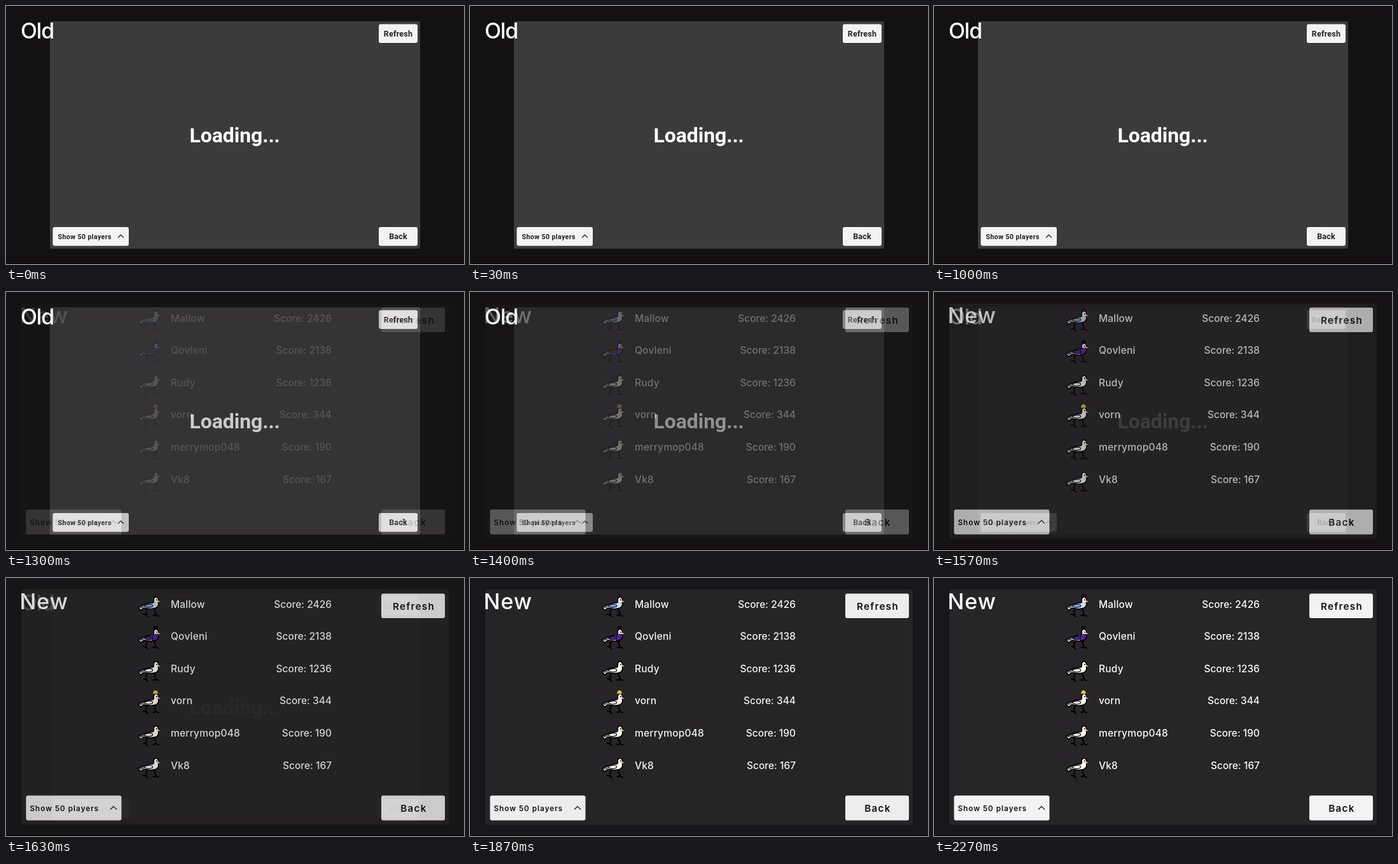
An HTML page with a canvas that plays this animation: 720x405 px, repeating every 3 s.

```html
<!DOCTYPE html>
<html lang="en">
<head>
<meta charset="utf-8">
<title>Leaderboard</title>
<style>
html, body { margin: 0; width: 100%; height: 100%; overflow: hidden; background: #000; }
canvas { display: block; width: 720px; height: 405px; }
</style>
</head>
<body>
<canvas id="stage" width="720" height="405"></canvas>
<script>
const W = 720, H = 405, LOOP = 3000;
const ctx = document.getElementById('stage').getContext('2d');

const OLD_FONT = 'Roboto, sans-serif';
const NEW_FONT = 'Inter, sans-serif';
const INK = '#242126', PAPER = '#f4f2f5';

function makeLayer(paint) {
  const layer = document.createElement('canvas');
  layer.width = W;
  layer.height = H;
  paint(layer.getContext('2d'));
  return layer;
}

function box(c, x, y, w, h, radius, fill) {
  c.fillStyle = fill;
  c.beginPath();
  c.roundRect(x, y, w, h, radius);
  c.fill();
}

function label(c, text, x, y, font, fill, align = 'left', spacing = 0) {
  c.font = font;
  c.fillStyle = fill;
  c.textAlign = align;
  c.letterSpacing = spacing + 'px';
  c.fillText(text, x, y);
}

function chevron(c, x, y, halfWidth, height) {
  c.strokeStyle = INK;
  c.lineWidth = 1.4;
  c.beginPath();
  c.moveTo(x - halfWidth, y + height);
  c.lineTo(x, y);
  c.lineTo(x + halfWidth, y + height);
  c.stroke();
}

function backdrop(c, outer) {
  c.fillStyle = outer;
  c.fillRect(0, 0, W, H - 1);
}

function paintOld(c) {
  backdrop(c, '#131114');
  box(c, 69, 24, 582, 357, 3, '#3d3a3d');
  label(c, 'Loading...', 359.7, 213.5, `700 32px ${OLD_FONT}`, '#fff', 'center', -0.1);

  box(c, 586, 28.5, 61, 29.5, 3, PAPER);
  box(c, 586, 347, 61, 29.5, 3, PAPER);
  box(c, 73.5, 347, 119.5, 29.5, 3, PAPER);
  const font = `600 12.5px ${OLD_FONT}`;
  label(c, 'Refresh', 616.5, 47.5, font, INK, 'center', 0.2);
  label(c, 'Back', 616.5, 366, font, INK, 'center', 0.2);
  label(c, 'Show 50 players', 81.5, 366, `600 10.8px ${OLD_FONT}`, INK, 'left', 0.3);
  chevron(c, 180.5, 359.5, 4.5, 4);
}

function bird(c, y, { plumage, hat }) {
  c.save();
  c.translate(206, y);
  c.lineCap = c.lineJoin = 'round';
  c.strokeStyle = '#000';

  c.lineWidth = 2;
  c.stroke(new Path2D('M15 8 L14 17 M10 16 L14 17 L17 20 M27 7 L30 17 M25 18 L30 17 L34 19'));

  const body = new Path2D(
    'M26 -7 Q27 -12 31 -11 Q35 -9 33.5 -3 Q35 3 30 6 Q22 9 11 6 ' +
    'L5 10 L2 5 L9 2 Q17 -2 25 -2 Q27 -4 26 -7 Z');
  const wing = new Path2D('M11 3 Q17 7 24 4 Q26 1 21 0 Q15 0 11 3 Z');
  c.fillStyle = '#fff';
  c.fill(body);
  if (plumage) {
    c.save();
    c.clip(body);
    c.fillStyle = plumage.chest;
    c.fillRect(23, -4, 13, 14);
    c.restore();
    c.fillStyle = plumage.wing;
    c.fill(wing);
  }
  c.lineWidth = 1.7;
  c.stroke(body);
  c.lineWidth = 1.2;
  c.stroke(wing);
  c.stroke(new Path2D('M5 6 L10 4'));

  c.fillStyle = '#e8c33a';
  c.fill(new Path2D('M33 -6 L37 -3.5 L33 -3 Z'));
  c.fillStyle = '#000';
  c.fillRect(30, -7.5, 1.8, 1.8);

  if (hat) {
    c.fillStyle = hat;
    c.fill(new Path2D('M25 -11 L26 -15 Q29 -18 32 -15 L33 -11 Z'));
  }
  c.restore();
}

const players = [
  { name: 'Mallow', score: 2426, hat: '#17151a', plumage: { chest: '#d0d8ee', wing: '#76a8e8' } },
  { name: 'Qovleni', score: 2138, hat: '#09070c', plumage: { chest: '#49269b', wing: '#49269b' } },
  { name: 'Rudy', score: 1236 },
  { name: 'vorn', score: 344, hat: '#f2c318' },
  { name: 'merrymop048', score: 190 },
  { name: 'Vk8', score: 167 },
];

function paintNew(c) {
  backdrop(c, '#19171b');
  box(c, 24, 18, 672, 369, 2, '#272528');

  const rowFont = `450 15.5px ${NEW_FONT}`;
  players.forEach((player, i) => {
    const y = 41 + i * 50.6;
    bird(c, y, player);
    label(c, player.name, 259, y + 5.6, rowFont, '#fafafa', 'left', 0.2);
    label(c, `Score: ${player.score}`, 512, y + 5.6, rowFont, '#fafafa', 'right');
  });

  box(c, 590, 24.5, 100, 38.5, 3, PAPER);
  box(c, 590, 341.5, 100, 39, 3, PAPER);
  box(c, 31.5, 341.5, 150, 39, 3, PAPER);
  const font = `600 15.2px ${NEW_FONT}`;
  label(c, 'Refresh', 641, 50, font, '#100e12', 'center', 1.3);
  label(c, 'Back', 641, 367, font, '#100e12', 'center', 1.3);
  label(c, 'Show 50 players', 37.5, 366, `600 11.7px ${NEW_FONT}`, '#100e12', 'left', 1);
  chevron(c, 169, 358.5, 5, 5);
}

// Linear interpolation through [time, value] keys.
function track(t, keys) {
  if (t <= keys[0][0]) return keys[0][1];
  for (let i = 1; i < keys.length; i++) {
    const [t0, v0] = keys[i - 1], [t1, v1] = keys[i];
    if (t < t1) return v0 + (v1 - v0) * (t - t0) / (t1 - t0);
  }
  return keys[keys.length - 1][1];
}

const oldScreen = makeLayer(paintOld);
const newScreen = makeLayer(paintNew);
const fadeOut = [[1170, 1], [1240, 0.92], [1400, 0.52], [1500, 0.25], [1630, 0.035], [1680, 0]];
const fadeIn = [[1170, 0], [1240, 0.05], [1400, 0.32], [1500, 0.54], [1630, 0.83], [1800, 0.97], [2130, 1]];
const oldTitleFade = [[1375, 1], [1500, 0.6], [1630, 0.17], [1690, 0]];

function render(t) {
  const oldAlpha = track(t, fadeOut), newAlpha = track(t, fadeIn);
  ctx.globalCompositeOperation = 'source-over';
  ctx.globalAlpha = 1;
  ctx.fillStyle = '#000';
  ctx.fillRect(0, 0, W, H);

  // Both screens fade over black, so their light adds up.
  ctx.globalCompositeOperation = 'lighter';
  ctx.globalAlpha = oldAlpha;
  ctx.drawImage(oldScreen, 0, 0);
  ctx.globalAlpha = newAlpha;
  ctx.drawImage(newScreen, 0, 0);

  ctx.globalCompositeOperation = 'source-over';
  label(ctx, 'New', 21.5, 49, `450 34.2px ${NEW_FONT}`, '#fff', 'left', 0.9);
  ctx.globalAlpha = track(t, oldTitleFade);
  label(ctx, 'Old', 23, 51, `450 34px ${NEW_FONT}`, '#fff', 'left', -1.2);
}

const start = performance.now();
function frame() {
  render((performance.now() - start) % LOOP);
  requestAnimationFrame(frame);
}
frame();
</script>
</body>
</html>
```
